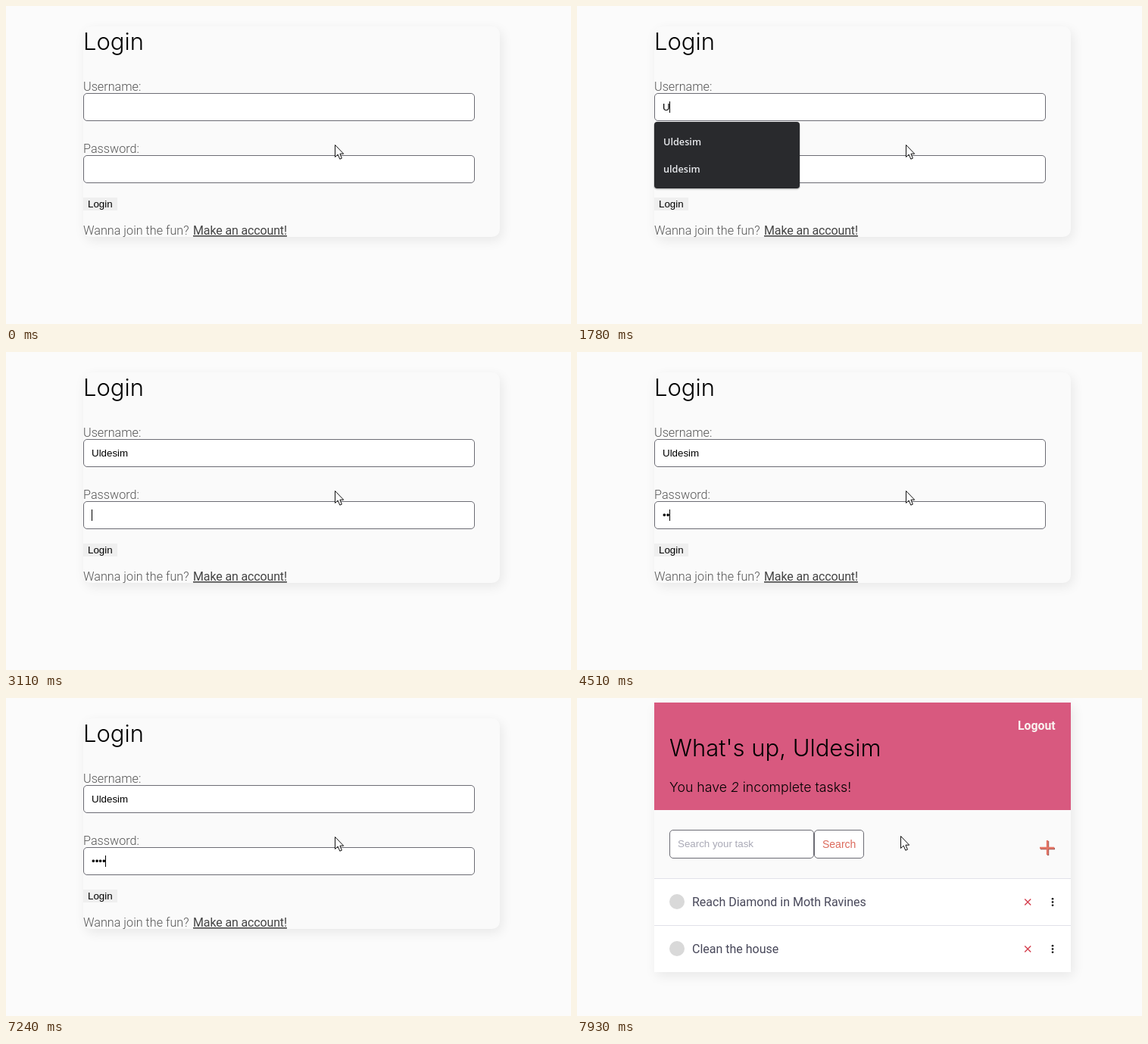
These frames come from a looping animation (746 by 420 pixels, 8000 ms). An HTML page:

```html
<!DOCTYPE html>
<html lang="en">
<head>
<meta charset="utf-8">
<title>Login to task list</title>
<style>
  html, body { margin: 0; width: 100%; height: 100%; overflow: hidden; background: #fbfbfb; }
  body { position: relative; }
  .page { position: absolute; left: 0; top: 0; width: 746px; height: 420px; }
  .card {
    position: absolute; left: 102px; width: 550px; background: #fafafa;
    box-shadow: 3px 5px 15px rgba(0, 0, 0, .08);
  }
  #login .card { top: 27px; height: 278px; border-radius: 10px; }
  #tasks .card { top: 6px; height: 356px; }
  svg { position: absolute; left: 0; top: 0; display: block; }
  text { white-space: pre; }
  .head { font: 350 31px Inter, sans-serif; fill: #000; }
  .sub { font: 350 17.7px Inter, sans-serif; fill: #000; }
  .label { font: 300 16.2px Roboto, sans-serif; fill: #555; }
  .link { font: 400 16px Roboto, sans-serif; letter-spacing: -.14px; fill: #444; text-decoration: underline; }
  .task { font: 400 16px Roboto, sans-serif; fill: #48485a; }
  .logout { font: 600 15.8px Roboto, sans-serif; fill: #faf3f1; }
  .form { font: 13.333px "Liberation Sans", Arial, sans-serif; fill: #000; }
  .hint { fill: #a9a9b6; }
  .find { font-size: 14px; fill: #dc6a5c; }
  .item { font: 600 12.7px "Open Sans", sans-serif; fill: #e8eaed; }
  .field { fill: #fff; stroke: #6c6c74; }
</style>
</head>
<body>
<div class="page" id="login">
  <div class="card"></div>
  <svg width="746" height="420">
    <text class="head" x="102" y="58">Login</text>
    <text class="label" x="102" y="112">Username:</text>
    <rect class="field" x="102.5" y="115.5" width="516" height="36" rx="4.5"/>
    <text class="label" x="102" y="194">Password:</text>
    <rect class="field" x="102.5" y="197.5" width="516" height="36" rx="4.5"/>
    <text class="form" id="user" x="113" y="138"></text>
    <text class="form" id="pass" x="113" y="220"></text>
    <rect id="caret" width="1" height="15"/>
    <rect x="102" y="253" width="45" height="17" fill="#efefef"/>
    <text class="form" x="108" y="266">Login</text>
    <text class="label" x="102" y="302">Wanna join the fun?</text>
    <text class="link" x="247" y="302">Make an account!</text>
    <g id="menu">
      <rect x="101" y="153" width="194" height="90" rx="5" fill="#000" opacity=".14"/>
      <rect x="102" y="153" width="192" height="88" rx="4" fill="#292a2d"/>
      <text class="item" id="pick1" x="114" y="184"></text>
      <text class="item" id="pick2" x="114" y="220"></text>
    </g>
  </svg>
</div>

<div class="page" id="tasks">
  <div class="card"></div>
  <svg width="746" height="420">
    <rect x="102" y="6" width="550" height="142" fill="#d8597f"/>
    <text class="logout" x="582" y="42">Logout</text>
    <text class="head" id="hello" x="122" y="77"></text>
    <text class="sub" x="122" y="124">You have <tspan font-style="italic">2</tspan> incomplete tasks!</text>
    <rect class="field" x="122.5" y="174.5" width="190" height="37" rx="4.5"/>
    <text class="form hint" x="133" y="197">Search your task</text>
    <rect class="field" x="313.5" y="174.5" width="65" height="37" rx="4.5"/>
    <text class="form find" x="324" y="198">Search</text>
    <g fill="none" stroke-width="2.4">
      <path d="M612 199H631M622 189V208" stroke="#a4605c"/>
      <path d="M611 198H630M621 188V207" stroke="#e57464"/>
    </g>
    <rect x="102" y="238" width="550" height="124" fill="#fff"/>
    <path d="M102 238.5H652M102 300.5H652" stroke="#e1e1e9"/>
    <g id="rows"></g>
  </svg>
</div>

<svg width="746" height="420">
  <path id="mouse" d="M.5 .5V16.5L4.2 13.1L6.8 19.2L9.4 18.1L6.9 12.2H11.7Z" fill="#fff" stroke="#111"/>
</svg>

<script>
const LOOP = 8000, BLINK = 530, NAME = 'Uldesim';
const FOCUS = 120, LEAVE = 3040, NEXT = 3110, ENTER = 7770;
const nameKeys = [1780, 2050, 2150, 2250, 2510, 2640, 2910];
const passKeys = [4110, 4510, 4850, 5110];

const $ = id => document.getElementById(id);
const show = (id, on) => { $(id).style.visibility = on ? 'visible' : 'hidden'; };
const past = (times, t) => times.filter(k => k <= t);

const taskRow = (title, y) => `
  <circle cx="132" cy="${y}" r="10" fill="#d9d9d9"/>
  <text class="task" x="152" y="${y + 6}">${title}</text>
  <path d="M591.2 ${y - 3.5}l8 8m0 -8l-8 8" stroke="#d5404f" stroke-width="1.4"/>
  ${[-1, 0, 1].map(i => `<circle cx="628" cy="${y + .5 + i * 4.3}" r="1.3"/>`).join('')}`;

$('rows').innerHTML = ['Reach Diamond in Moth Ravines', 'Clean the house']
  .map((title, i) => taskRow(title, 269 + 62 * i)).join('');
$('hello').textContent = "What's up, " + NAME;
$('pick1').textContent = NAME;
$('pick2').textContent = NAME.toLowerCase();

// The caret blinks from the moment of focus; every key press restarts it.
function drawCaret(t, box, y, start, keys) {
  const since = t - [start, ...past(keys, t)].pop();
  const width = box.textContent ? box.getComputedTextLength() : 0;
  $('caret').setAttribute('x', Math.floor(113 + width));
  $('caret').setAttribute('y', y);
  show('caret', since >= 0 && Math.floor(since / BLINK) % 2 === 0);
}

function drawLogin(t) {
  $('user').textContent = NAME.slice(0, past(nameKeys, t).length);
  $('pass').textContent = '•'.repeat(past(passKeys, t).length);
  show('menu', t >= nameKeys[0] && t < NEXT);
  if (t < LEAVE) drawCaret(t, $('user'), 126, FOCUS, nameKeys);
  else if (t < NEXT) show('caret', false);
  else drawCaret(t, $('pass'), 208, NEXT, passKeys);
}

function draw(t) {
  const inside = t >= ENTER;
  const drift = inside ? Math.min(1, Math.floor((t - ENTER) / 80) / 2) : 0;
  $('login').style.display = inside ? 'none' : 'block';
  $('tasks').style.display = inside ? 'block' : 'none';
  $('mouse').setAttribute('transform',
    `translate(${Math.round(434 - 7 * drift)} ${Math.round(183 - drift)})`);
  if (inside) show('caret', false), show('menu', false);
  else drawLogin(t);
}

function tick() {
  draw(performance.now() % LOOP);
  requestAnimationFrame(tick);
}
tick();
</script>
</body>
</html>
```
